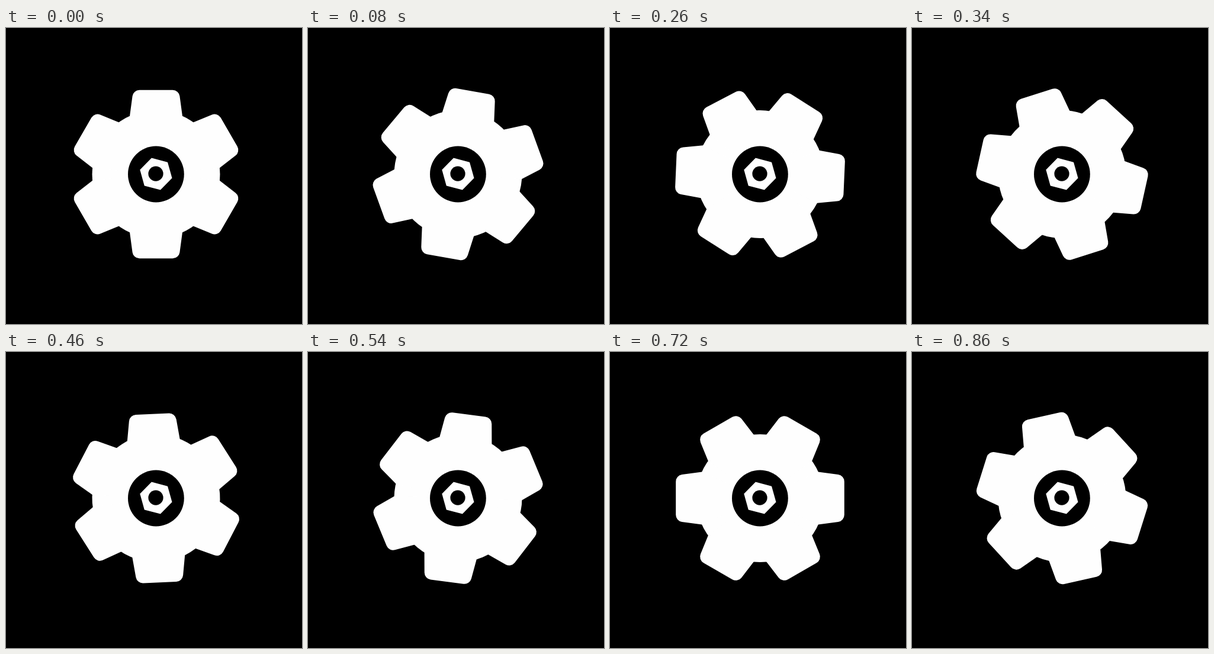
An HTML page with a canvas that plays this animation: 500x500 px, repeating every 880 ms.

```html
<!DOCTYPE html>
<html lang="en">
<head>
<meta charset="utf-8">
<title>Turning gear</title>
<style>
  html, body { margin: 0; width: 100%; height: 100%; overflow: hidden; background: #000; }
  canvas { display: block; }
</style>
</head>
<body>
<canvas id="stage" width="500" height="500"></canvas>
<script>
const ctx = document.getElementById('stage').getContext('2d');
const WHITE = '#fefefe', BLACK = '#000';
const LOOP = 880, STEP = 20, DEG_PER_STEP = 2.5;
const CX = 253.5, CY = 247;
const BODY_R = 108;
const TOOTH = { base: 98, baseHalf: 44.5, tip: 142.3, tipHalf: 38.5, corner: 12 };
const rad = deg => deg * Math.PI / 180;

function disc(x, y, r, color) {
  ctx.fillStyle = color;
  ctx.beginPath();
  ctx.arc(x, y, r, 0, 2 * Math.PI);
  ctx.fill();
}

function tooth() {
  const { base, baseHalf, tip, tipHalf, corner } = TOOTH;
  ctx.beginPath();
  ctx.moveTo(0, 0);
  ctx.lineTo(-baseHalf, -base);
  ctx.arcTo(-tipHalf, -tip, 0, -tip, corner);
  ctx.arcTo(tipHalf, -tip, baseHalf, -base, corner);
  ctx.lineTo(baseHalf, -base);
  ctx.fill();
}

function gear(deg) {
  ctx.save();
  ctx.translate(CX, CY);
  ctx.rotate(rad(deg));
  disc(0, 0, BODY_R, WHITE);
  for (let i = 0; i < 6; i++) {
    tooth();
    ctx.rotate(rad(60));
  }
  ctx.restore();
}

function nut(x, y, r, deg) {
  ctx.fillStyle = WHITE;
  ctx.beginPath();
  for (let i = 0; i < 6; i++) {
    const a = rad(deg + 60 * i);
    ctx.lineTo(x + r * Math.cos(a), y + r * Math.sin(a));
  }
  ctx.fill();
  disc(x - 0.4, y - 0.5, 12.6, BLACK);
}

function draw(now) {
  // The turn stops short of a full tooth pitch, so the loop ends with a jump.
  const step = Math.floor((now % LOOP) / STEP);
  ctx.fillStyle = BLACK;
  ctx.fillRect(0, 0, 500, 500);
  gear(step * DEG_PER_STEP);
  disc(253.4, CY, 47.4, BLACK);
  nut(253.4, 246.6, 28, 14.5);
}

let start;
function tick(now) {
  start ??= now;
  draw(now - start);
  requestAnimationFrame(tick);
}
draw(0);
requestAnimationFrame(tick);
</script>
</body>
</html>
```
